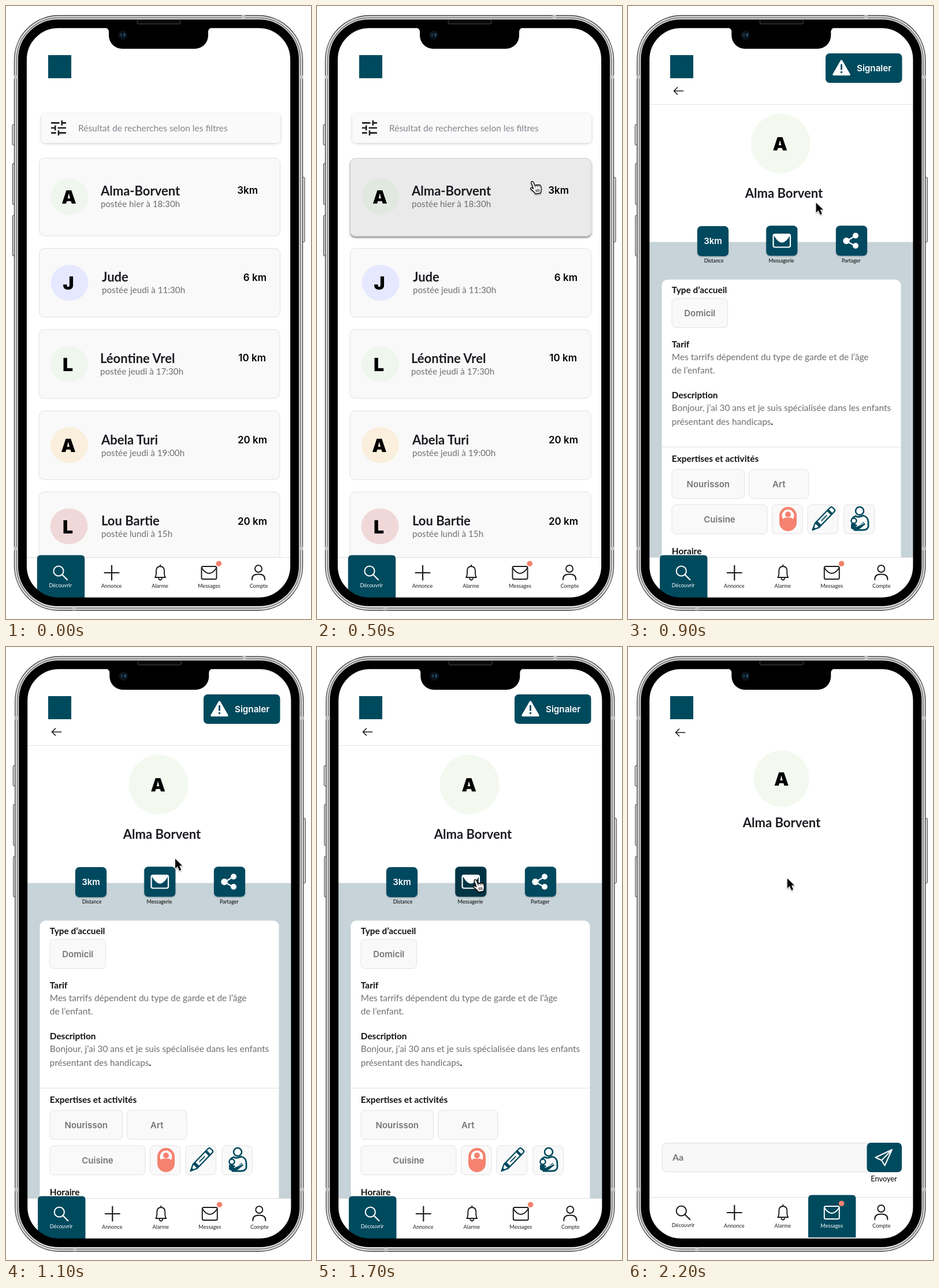
An HTML page that plays this animation: 528x1061 px, repeating every 2.67 s.

```html
<!DOCTYPE html>
<html lang="fr">
<head>
<meta charset="utf-8">
<title>Recherche et messagerie</title>
<style>
html, body { margin: 0; width: 100%; height: 100%; overflow: hidden; background: #fff; }
svg { display: block; width: 100vw; height: 100vh; }
text { font-family: Lato, "Open Sans", sans-serif; white-space: pre; }
.inter { font-family: Inter, Roboto, sans-serif; font-weight: 600; }
.bold { font-weight: 700; }
.line { fill: none; stroke-linecap: round; stroke-linejoin: round; }
</style>
</head>
<body>
<svg id="stage" viewBox="0 0 528 1061" preserveAspectRatio="none"></svg>
<script>
const LOOP = 2670, STEP = 100, SHIFT = 1.3;
const TEAL = '#004a5e', CORAL = '#f5826f', INK = '#1c1b22', GREY = '#6f6f6f';

const text = (x, y, size, fill, str, cls = '', anchor = 'start', extra = '') =>
  `<text x="${x}" y="${y}" font-size="${size}" fill="${fill}" class="${cls}" text-anchor="${anchor}" ${extra}>${str}</text>`;
const mid = (x, y, size, fill, str, cls) => text(x, y, size, fill, str, cls, 'middle');
const rect = (x, y, w, h, r, fill, extra = '') =>
  `<rect x="${x}" y="${y}" width="${w}" height="${h}" rx="${r}" fill="${fill}" ${extra}/>`;
const oval = (x, y, rx, ry, fill, extra = '') =>
  `<ellipse cx="${x}" cy="${y}" rx="${rx}" ry="${ry}" fill="${fill}" ${extra}/>`;
const dot = (x, y, r, fill, extra) => oval(x, y, r, r, fill, extra);
const line = (d, color, width, extra = '') =>
  `<path class="line" d="${d}" stroke="${color}" stroke-width="${width}" ${extra}/>`;
const shape = (d, fill, extra = '') => `<path d="${d}" fill="${fill}" ${extra}/>`;
const move = (x, y, body) => `<g transform="translate(${x} ${y})">${body}</g>`;
const initial = (x, y, letter) =>
  text(x, y, 32, '#000', letter, 'inter', 'middle', 'style="font-weight:900"');
const emblem = () => rect(73, 85, 40, 40, 0, TEAL);

/* Phone */
const body = () => {
  const key = (x, y, h) => rect(x, y, 5, h, 1.5, '#e4e4e4', 'stroke="#333"');
  return key(11, 205.5, 35) + key(11.5, 272.5, 71) + key(11.5, 362.5, 70) + key(512, 296.5, 112) +
    rect(14.5, 16.5, 499, 1029.5, 77, '#e2e2e2', 'stroke="#3c3c3c" stroke-width="1.3"') +
    rect(18.5, 20.5, 491, 1021.5, 73, '#f0f0f0', 'stroke="#808080" stroke-width="2"') +
    rect(28, 31, 472, 1000, 62, '#fff');
};

const bezel = () => {
  const band = (x, y, w, h) => rect(x, y, w, h, 0, '#c4c4c4');
  return rect(28.4, 30.7, 471.2, 1000.6, 62, 'none', 'stroke="#000" stroke-width="15"') +
    band(14, 120, 7, 6) + band(507, 120, 7, 6) + band(14, 936, 7, 6) + band(507, 936, 7, 6) +
    band(408, 16, 6, 6) + band(115, 1040, 6, 6) +
    shape('M171 37.5A7 7 0 0 1 178 45V51A23 23 0 0 0 201 74H327A23 23 0 0 0 350 51V45A7 7 0 0 1 357 37.5Z', '#000') +
    rect(227, 23.5, 75, 7.5, 2, '#0a0a0a', 'stroke="#555" stroke-width=".9"') +
    dot(202, 50.5, 8, '#0b1117') + oval(199.3, 50, 1.8, 3.3, '#17384a') + oval(205, 50, 1.6, 3.3, '#24507a');
};

/* Bottom bar */
const icons = {
  find: c => dot(91, 978, 8.6, 'none', `stroke="${c}" stroke-width="2"`) + line('M97.5 984.5L106 993', c, 2.2),
  add: c => line('M170.500 981H195.500M183 968.500V993.500', c, 2.2),
  bell: c => line('M258 989H276C273.5 986 274 982 274 978C274 972.5 271 970 267 970S260 972.5 260 978C260 982 260.500 986 258 989ZM267 970V967.500M264 991Q267 996 270 991', c, 1.9),
  mail: c => rect(338.5, 970, 26, 22, 2.5, 'none', `stroke="${c}" stroke-width="2"`) +
    line('M339 973Q351.500 991 364 973', c, 2) + dot(368.3, 965.2, 4.8, CORAL),
  user: c => dot(437, 974, 6, 'none', `stroke="${c}" stroke-width="2"`) +
    line('M426 993V991.500C426 986 430 983.500 437 983.500S448 986 448 991.500V993', c, 2)
};
const tabs = [
  ['find', 94.3, 'Découvrir'], ['add', 182.5, 'Annonce'], ['bell', 266.5, 'Alarme'],
  ['mail', 351.5, 'Messages'], ['user', 437.5, 'Compte']
];
const nav = (active, dx, dy) => move(dx, dy,
  rect(36, 954, 457, 76, 0, '#fff') + line('M36 954.5H493', '#dedede', 1) +
  tabs.map(([icon, x, label], i) => {
    const on = icon === active, color = on ? '#fff' : '#1d1d1d';
    const tab = shape(`M${i ? 310.7 : 53.8} 1024v-67q0-6.400 6-6.400h70.400q6 0 6 6.400v67z`, TEAL);
    return (on ? tab : '') + icons[icon](color) + mid(x, i ? 1007 : 1006, 9.1, color, label);
  }).join(''));

const backArrow = (x, y) => line(`M${x + 16} ${y}H${x}m6 -6l-6 6l6 6`, '#1d1d1d', 1.7);

/* Result list */
const people = [
  { x: 57.5, y: 263.5, h: 134.5, tint: '#eff6ee', cx: 110, cy: 330, ax: 109, name: 'Alma-Borvent', nx: 164, by: 328, when: 'hier à 18:30h', km: '3km', kx: 436, ky: 325 },
  { x: 57.5, y: 419.5, h: 119, tint: '#e5e8ff', cx: 110, cy: 479, ax: 108, name: 'Jude', nx: 166, by: 477, when: 'jeudi à 11:30h', km: '6 km', kx: 451, ky: 476 },
  { x: 57, y: 560, h: 119, tint: '#eff6ee', cx: 109.5, cy: 620, ax: 107, name: 'Léontine Vrel', nx: 163, by: 618, when: 'jeudi à 17:30h', km: '10 km', kx: 450, ky: 614.5 },
  { x: 57, y: 700.7, h: 119, tint: '#faefdc', cx: 109.5, cy: 760, ax: 108, name: 'Abela Turi', nx: 165, by: 758.5, when: 'jeudi à 19:00h', km: '20 km', kx: 452, ky: 757 },
  { x: 57, y: 841, h: 130, tint: '#f1d8d8', cx: 109, cy: 900.5, ax: 107, name: 'Lou Bartie', nx: 165, by: 899, when: 'lundi à 15h', km: '20 km', kx: 452, ky: 897.5 }
];

const person = (p, i) =>
  (i ? '' : rect(57, 263, 418.5, 135.5, 9, '#fff', 'class="hover" filter="url(#lift)"')) +
  rect(p.x, p.y, 417, p.h, 9, '#f9f9f9', 'stroke="#e0e0e0"') +
  oval(p.cx, p.cy, 32.5, 31, p.tint) +
  (i ? '' : rect(57, 263, 418.5, 135.5, 9, '#000', 'class="hover" opacity=".06"')) +
  initial(p.ax, p.cy + 12, p.name[0]) +
  text(p.nx, p.by, 22, INK, p.name, 'bold') +
  text(p.nx, p.by + 20, 15.2, GREY, 'postée ' + p.when) +
  text(p.kx, p.ky, 17, '#000', p.km, 'inter', 'end');

const listScreen = () => emblem() +
  rect(61, 186.5, 414, 50.5, 7, '#fafafa', 'filter="url(#soft)"') +
  `<g transform="translate(73.700 193.700) scale(1.44)"><path d="M3 18h6M12 15v6M12 18h9M3 12h5M8 9v6M11 12h10M3 6h10M16 3v6M16 6h5" fill="none" stroke="#1d1d1d" stroke-width="1.800"/></g>` +
  text(125, 216.5, 15.5, '#80868e', 'Résultat de recherches selon les filtres') +
  people.map(person).join('') + nav('find', 0, 0);

/* Profile */
const chip = (x, y, w, label = '') =>
  rect(x, y, w, 50.5, 7, '#f9f9f9', 'stroke="#e2e2e2"') + mid(x + w / 2, y + 30.5, 15, '#757575', label, 'inter');
const tile = (x, y, label, lx, art, extra = '') =>
  rect(x, y, 54, 52, 7, TEAL, `filter="url(#small)" ${extra}`) + art + mid(lx, 444, 8.8, '#000', label);
const heading = (y, str) => text(75.8, y, 15.4, '#111', str, 'bold');
const para = (y, str) => text(75.8, y, 15.45, GREY, str);

const babyIcon = () => rect(262, 867, 30, 42, 15, CORAL) + dot(277, 882, 10.5, '#fff') +
  dot(277, 880, 5, CORAL) + shape('M268 889Q269 885 274 885.500H280Q285 885 286 889Q277 898 268 889Z', CORAL);
const crayonIcon = () => `<g transform="translate(319.500 907) rotate(-46) scale(1.13)">` +
  line('M0 0L10 -4.500H43Q46 -4.500 46 -2V2Q46 4.500 43 4.500H10Z', TEAL, 2) +
  shape('M10 -5H15V5H10ZM36 -5H40V5H36ZM0 0L5 -2.500V2.500Z', TEAL) + line('M20 0H31', TEAL, 1.6) + '</g>';
const carerIcon = () => dot(401, 874, 7, '#fff', `stroke="${TEAL}" stroke-width="2.600"`) +
  line('M394 883Q387 885 387 893M394 883Q399 886 407 882Q416 884 416 894V901Q415 907 406 907H392', TEAL, 2.8) +
  dot(391, 891, 4.5, '#fff', `stroke="${TEAL}" stroke-width="2.400"`) +
  shape('M386 896Q393 894 398 900L408 893L411 897L401 905Q392 910 386 904Z', TEAL) +
  line('M395 901L409 895', '#fff', 1.3);

const profileScreen = () => emblem() + backArrow(79.5, 147) +
  rect(342, 82, 132.5, 51, 7, TEAL) +
  shape('M369.500 95L383 118.500H356Z', '#fff', 'stroke="#fff" stroke-width="3.500" stroke-linejoin="round"') +
  line('M369.500 102V109.500', TEAL, 2.8) + dot(369.5, 114.5, 1.8, TEAL) +
  text(396, 113, 15.2, '#fff', 'Signaler', 'inter') +
  line('M37 170.500H493', '#e4e4e4', 1) +
  dot(264, 238, 51.5, '#f4f9f0') + initial(263.3, 249.5, 'A') +
  mid(270, 331.5, 22, INK, 'Alma Borvent', 'bold') +
  rect(36, 408.5, 458, 560, 0, '#c6d3d8') +
  tile(120, 381, 'Distance', 148.5, mid(147, 412, 15, '#fff', '3km', 'inter')) +
  tile(239.3, 380.3, 'Messagerie', 265.5,
    rect(251.5, 395, 29.5, 22.5, 3, 'none', 'stroke="#fff" stroke-width="2.200"') +
    shape('M252 396H281Q266.500 423 252 396Z', '#fff'), 'id="mailTile"') +
  tile(360, 380.3, 'Partager', 386.2,
    line('M394 397.500L378 407L394 415.500', '#fff', 2.2) + dot(378, 406.5, 5.7, '#fff') +
    dot(394, 397.5, 5, '#fff') + dot(394, 415, 5, '#fff')) +
  rect(58.5, 473.5, 414, 500, 10, '#fff') +
  heading(496.5, 'Type d’accueil') + chip(76, 506, 96.5, 'Domicil') +
  heading(591, 'Tarif') + para(612.5, 'Mes tarrifs dépendent du type de garde et de l’âge') + para(636, 'de l’enfant.') +
  heading(678.5, 'Description') +
  para(701, 'Bonjour, j’ai 30 ans et je suis spécialisée dans les enfants') +
  para(724.5, 'présentant des handicaps<tspan fill="#000" font-weight="700">.</tspan>') +
  line('M59 763.500H472', '#e2e2e2', 1) +
  heading(789, 'Expertises et activités') +
  chip(76, 802, 125.5, 'Nourisson') + chip(209.5, 802, 103.5, 'Art') + chip(76, 863, 165, 'Cuisine') +
  chip(249.5, 863, 52.5) + chip(311, 863, 52.5) + chip(374, 863, 52.5) +
  babyIcon() + crayonIcon() + carerIcon() +
  heading(949, 'Horaire') + nav('find', SHIFT, 0);

/* Conversation */
const chatScreen = () => emblem() + backArrow(82.5, 148) +
  oval(265.7, 228, 48, 49, '#f4f9f0') + initial(265.7, 239.5, 'A') +
  mid(266, 312, 22, INK, 'Alma Borvent', 'bold') +
  rect(59, 858.5, 370, 50, 8, '#f8f8f9', 'stroke="#dedede"') + text(77, 889, 16, '#757575', 'Aa', 'bold') +
  rect(413.5, 858, 60.5, 51, 7, TEAL) +
  line('M457 870L428.500 883.500L439 888.500L444.500 897.500ZL439 888.500', '#fff', 2) +
  mid(443, 924.5, 12.8, '#000', 'Envoyer') + nav('mail', SHIFT, -2);

/* Pointers */
const arrow = shape('M0 0V17L4 13.300L7.200 20.500L10.200 19.200L7.100 12H12.200Z', '#000',
  'stroke="#fff" stroke-width="1.300" stroke-linejoin="round" paint-order="stroke"');
const hand = `<g transform="translate(-2.500 2.500) rotate(-10)">` +
  shape('M-1.500 1.500C-1 -1 2 -.5 2.500 1.500L4 8c.5-1.500 3-1.500 3.500 0c.8-1.300 3-1 3.300.5c1-1 3-.5 3 1.500v5c0 3-2 4-2 7H2.500C2 19-2 15-4 12.500c-1.200-2 1-3 2.500-2l2 2z',
    '#fff', 'stroke="#000" stroke-width="1.300" stroke-linejoin="round"') +
  line('M4.500 14.500V19M7 14.500V19M9.500 14.500V19M4 8L4.500 10.500M7.500 8L7.800 10.500M10.800 8.500L11 10.500', '#000', 1) + '</g>';

const shadow = (id, dy, blur, alpha) =>
  `<filter id="${id}" x="-20%" y="-30%" width="140%" height="170%"><feDropShadow dx="0" dy="${dy}" stdDeviation="${blur}" flood-opacity="${alpha}"/></filter>`;

const $ = id => document.getElementById(id);
$('stage').innerHTML =
  `<defs>${shadow('lift', 2.8, 1.6, .45)}${shadow('soft', 1, 2.5, .2)}${shadow('small', 1, 1, .3)}${shadow('drop', 1.5, 1, .4)}
  <clipPath id="screen">${rect(30, 32, 470, 998, 60, '#000')}</clipPath></defs>
  <g class="phone">${body()}</g>
  <g clip-path="url(#screen)"><g id="list">${listScreen()}</g><g id="profile">${profileScreen()}</g><g id="chat">${chatScreen()}</g></g>
  <g class="phone">${bezel()}</g>
  <g id="pointer" filter="url(#drop)"><g id="arrow">${arrow}</g><g id="hand">${hand}</g></g>`;

const phone = document.querySelectorAll('.phone'), hovers = document.querySelectorAll('.hover');
const show = (el, on) => { el.style.display = on ? '' : 'none'; };

// Pointer route: time, x, y
const route = [
  [100, 492, 356], [400, 380, 306], [500, 374.5, 301.5], [600, 374.5, 301.5],
  [1100, 293, 366.5], [1200, 279.5, 389], [1300, 275.8, 400.5], [LOOP, 275.8, 400.5]
];
function pointerAt(t) {
  const i = Math.max(1, route.findIndex(p => p[0] >= t));
  const [t0, x0, y0] = route[i - 1], [t1, x1, y1] = route[i];
  const k = Math.max(0, (t - t0) / (t1 - t0));
  return [x0 + (x1 - x0) * k, y0 + (y1 - y0) * k];
}

function render(ms) {
  const t = Math.floor((ms % LOOP) / STEP) * STEP;
  const scene = t < 600 ? 'list' : t < 1900 ? 'profile' : 'chat';
  ['list', 'profile', 'chat'].forEach(id => show($(id), id === scene));
  phone.forEach(g => g.setAttribute('transform', `translate(${scene === 'list' ? 0 : SHIFT} 0)`));

  const [x, y] = pointerAt(t);
  const onCard = scene === 'list' && t >= 200;
  const onTile = scene === 'profile' && t >= 1200;
  hovers.forEach(el => show(el, onCard));
  $('mailTile').setAttribute('fill', onTile ? '#003445' : TEAL);
  show($('pointer'), t >= 100);
  show($('hand'), onCard || onTile);
  show($('arrow'), !(onCard || onTile));
  $('pointer').setAttribute('transform', `translate(${x} ${y})`);
}

const start = performance.now();
function tick() {
  render(performance.now() - start);
  requestAnimationFrame(tick);
}
render(0);
requestAnimationFrame(tick);
</script>
</body>
</html>
```
